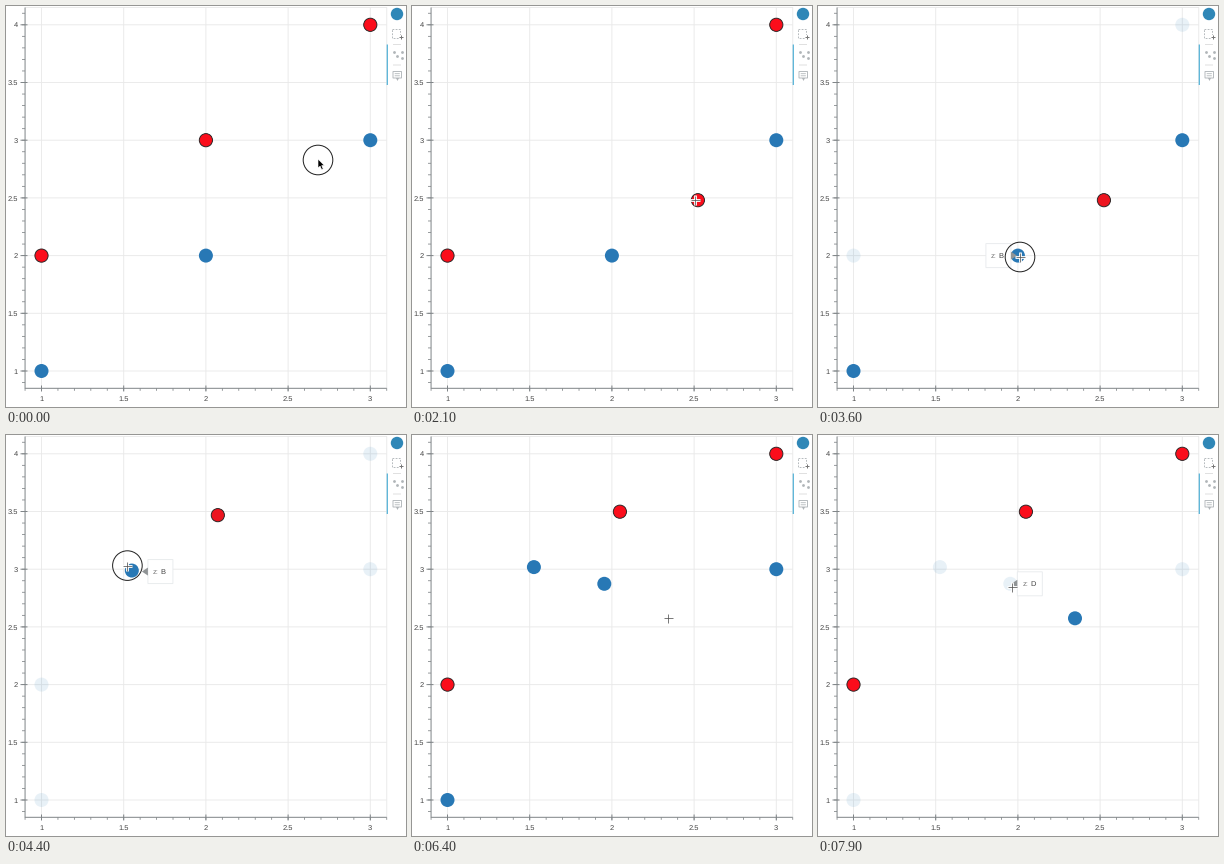
Recreate the animation shown at these times as a matplotlib script. Size 400 by 401 pixels, loop 8000 ms.

```python
import matplotlib.pyplot as plt
import numpy as np
from matplotlib.animation import FuncAnimation
from matplotlib.patches import Circle, Polygon, Rectangle

W, H, DPI = 400, 401, 100
STEP, FRAMES = 100, 80
PX = 72 / DPI
BLUE, RED, RED_PICKED = "#2878b5", "#fb0d1b", "#ec141f"
FADED = (0.12, 0.47, 0.71, 0.1)
GRID, AXIS, INK, ICON = "#e9e9e9", "#808588", "#444444", "#b0b5b8"

plt.rcParams.update({"font.family": "Liberation Sans", "text.hinting": "none",
                     "path.snap": False})
fig = plt.figure(figsize=(W / DPI, H / DPI), dpi=DPI, facecolor="white")
ax = fig.add_axes([0, 0, 1, 1])
ax.set(xlim=(0, W), ylim=(H, 0))
ax.axis("off")


def place(x, y):
    """Stage position of a data point."""
    return np.array([35.5 + (x - 1) * 164.4, 365 - (y - 1) * 115.4])


LEFT, BOTTOM = place(0.9, 0.85)
RIGHT, TOP = place(3.1, 4.15)


def line(xs, ys, color=AXIS, w=1, z=1, **kw):
    return ax.plot(xs, ys, color=color, lw=w * PX, zorder=z,
                   solid_capstyle="butt", **kw)[0]


def label(x, y, s, ha="center", z=2, color=INK):
    return ax.text(x, y, s, ha=ha, va="center_baseline", color=color,
                   fontsize=7.5 * PX, zorder=z)


def draw_axes():
    for v in np.arange(1, 4.1, 0.5):
        x, y = place(v, v)
        line([LEFT, RIGHT], [y, y], GRID, 0.9, 0)
        line([14.5, 21.5], [y, y])
        label(12, y, f"{v:g}", "right")
        if v <= 3:
            line([x, x], [TOP, BOTTOM], GRID, 0.9, 0)
            line([x, x], [379.5, 385.5])
            label(x, 392, f"{v:g}")
    for v in np.arange(0.9, 4.11, 0.1):
        x, y = place(v, v)
        line([16, LEFT], [y, y], w=0.8)
        if v < 3.11:
            line([x, x], [BOTTOM, 384.8], w=0.8)
    line([LEFT, RIGHT, RIGHT], [TOP, TOP, BOTTOM], GRID, 0.9, 0)
    line([LEFT, LEFT, RIGHT], [TOP, BOTTOM, BOTTOM])


def draw_toolbar():
    ax.add_patch(Circle((391, 8), 6.2, fc="#2f87b7", lw=0))
    line([381.3] * 2, [38.5, 79], "#4fb0d6", 1.2, 2)
    for y in (38.5, 59):
        line([387, 395], [y, y], "#dddddd", 0.9)
    # box select
    ax.add_patch(Rectangle((386.5, 23.5), 8, 9, fc="none", ec=ICON,
                           lw=0.9 * PX, ls=(0, (2, 1.5))))
    ax.plot(395, 30.5, "s", color="white", ms=5 * PX, mew=0)
    ax.plot(395, 30.5, "+", color="#777777", ms=4.4 * PX, mew=PX)
    # point draw
    ax.plot([387.5, 391, 395.5, 395.5], [45.5, 49.5, 46, 51.5], "o",
            color=ICON, ms=2.8 * PX, mew=0)
    # hover
    ax.add_patch(Rectangle((387, 65.5), 8.5, 6.5, fc="none", ec=ICON, lw=0.9 * PX))
    ax.plot(391.2, 73, "v", color=ICON, ms=3 * PX, mew=0)
    for y in (67.7, 69.8):
        line([388.7, 393.8], [y, y], ICON, 0.8, 2)


def ease(t, start, end):
    u = np.clip((t - start) / (end - start), 0, 1)
    return u * u * (3 - 2 * u)


# Story beats, in ms
PICK_RED, PICK_B, DROP_B = 2600, 3700, 4500
ADD_1, ADD_2, PICK_LAST = 5300, 6600, 7000
CLICKS = (0, PICK_RED, ADD_1, ADD_2, PICK_LAST)
TRAVEL = 600

# Where the mouse arrives: time, x, y
STOPS = [(0, 312, 154), (1100, 197, 134), (2000, 283, 194), (3300, 202, 251),
         (4350, 121.4, 130.6), (5100, 192, 149), (6200, 256, 183), (7700, 194, 152)]


def mouse(t):
    pos = np.array(STOPS[0][1:], float)
    for end, *goal in STOPS[1:]:
        pos += (goal - pos) * ease(t, end - TRAVEL, end)
    return pos


def pressed(t):
    return (any(abs(t - c) <= 100 for c in CLICKS)
            or 1200 <= t < 2000 or PICK_B - 100 <= t < DROP_B)


def shared_drag(t):
    # sideways motion settles slightly later than upward motion
    return np.array([-78, -117.5]) * ease(t, PICK_B, DROP_B + np.array([10, -20]))


def moving_red(t):
    return place(2, 3) + np.array([86, 60]) * ease(t, 1400, 2000) + shared_drag(t)


def moving_blue(t):
    return place(2, 2) + shared_drag(t)


def dot(pos):
    return ax.add_patch(Circle(pos, 7, zorder=4))


draw_axes()
draw_toolbar()
reds = [dot(place(v, v + 1)) for v in (1, 2, 3)]
blues = [dot(place(v, v)) for v in (1, 2, 3)]
blues += [dot((192.3, 148.8)), dot((257, 183.3))]

tip_box = ax.add_patch(Rectangle((0, 0), 25, 24, fc="white", ec="#e8ebed",
                                 lw=0.9 * PX, zorder=5))
tip_arrow = ax.add_patch(Polygon(np.zeros((3, 2)), fc="#909496", lw=0, zorder=6))
tip_key = label(0, 0, "z:", "left", 6, "#777777")
tip_value = label(0, 0, "B", "left", 6)
tip = [tip_box, tip_arrow, tip_key, tip_value]

ring = ax.add_patch(Circle((0, 0), 14.8, fc="none", ec="#222222",
                           lw=PX, zorder=8))
cross = [ax.plot([], [], "+", color=c, ms=s * PX, mew=w * PX, zorder=9)[0]
         for c, s, w in (("white", 10, 2.8), ("#5a5a5a", 9, 0.8))]
ARROW = np.array([(0, 0), (0, 9), (2.1, 7.2), (3.6, 10.6), (5.2, 9.9),
                  (3.7, 6.6), (6.4, 6.5)])
arrow = ax.add_patch(Polygon(ARROW, fc="black", ec="white", lw=0.6 * PX, zorder=10))


def paint(d, color, faded, outlined=False):
    if faded:
        d.set(fc=FADED, lw=0, radius=7)
    elif outlined:
        d.set(fc=color, ec="#222222", lw=0.9 * PX, radius=6.6)
    else:
        d.set(fc=color, lw=0, radius=7)


def show_tip(t, pos):
    dragging = PICK_B <= t <= DROP_B
    hit = [1] if dragging else [
        i for i, d in enumerate(blues)
        if d.get_visible() and np.hypot(*(d.center - pos)) < 7]
    for part in tip:
        part.set_visible(bool(hit))
    if not hit:
        return
    x, y = blues[hit[0]].center
    if dragging:
        x = moving_blue(t - STEP)[0]
        y += 1
    side = 1 if x < W / 2 - 0.5 else -1
    edge = x + 7 * side
    left = min(edge, edge + 25 * side)
    tip_box.set_xy((left, y - 12))
    tip_arrow.set_xy([(edge - 6 * side, y), (edge, y - 4), (edge, y + 4)])
    tip_key.set_position((left + 5, y))
    tip_value.set_position((left + 12.6, y))
    tip_value.set_text("ABCDD"[hit[0]])


def update(i):
    t = i * STEP
    pos = mouse(t)
    reds[1].center = moving_red(t)
    blues[1].center = moving_blue(t)
    blues[3].set_visible(t >= ADD_1)
    blues[4].set_visible(t >= ADD_2)

    red_picked = PICK_RED <= t < ADD_1
    blue_picked = 1 if PICK_B <= t < ADD_1 else 4 if t >= PICK_LAST else None
    for k, d in enumerate(reds):
        paint(d, RED_PICKED if red_picked else RED, red_picked and k != 1, True)
    for k, d in enumerate(blues):
        paint(d, BLUE, blue_picked is not None and k != blue_picked)

    show_tip(t, pos)
    ring.center = pos
    ring.set_visible(pressed(t))
    for c in cross:
        c.set_data(*pos.reshape(2, 1))
        c.set_visible(t >= 400)
    arrow.set_xy(ARROW + pos - (0, 1))
    arrow.set_visible(t < 400)
    return []


anim = FuncAnimation(fig, update, frames=FRAMES, interval=STEP, repeat=True,
                     repeat_delay=0, init_func=lambda: update(0), blit=False)
plt.show()
```
